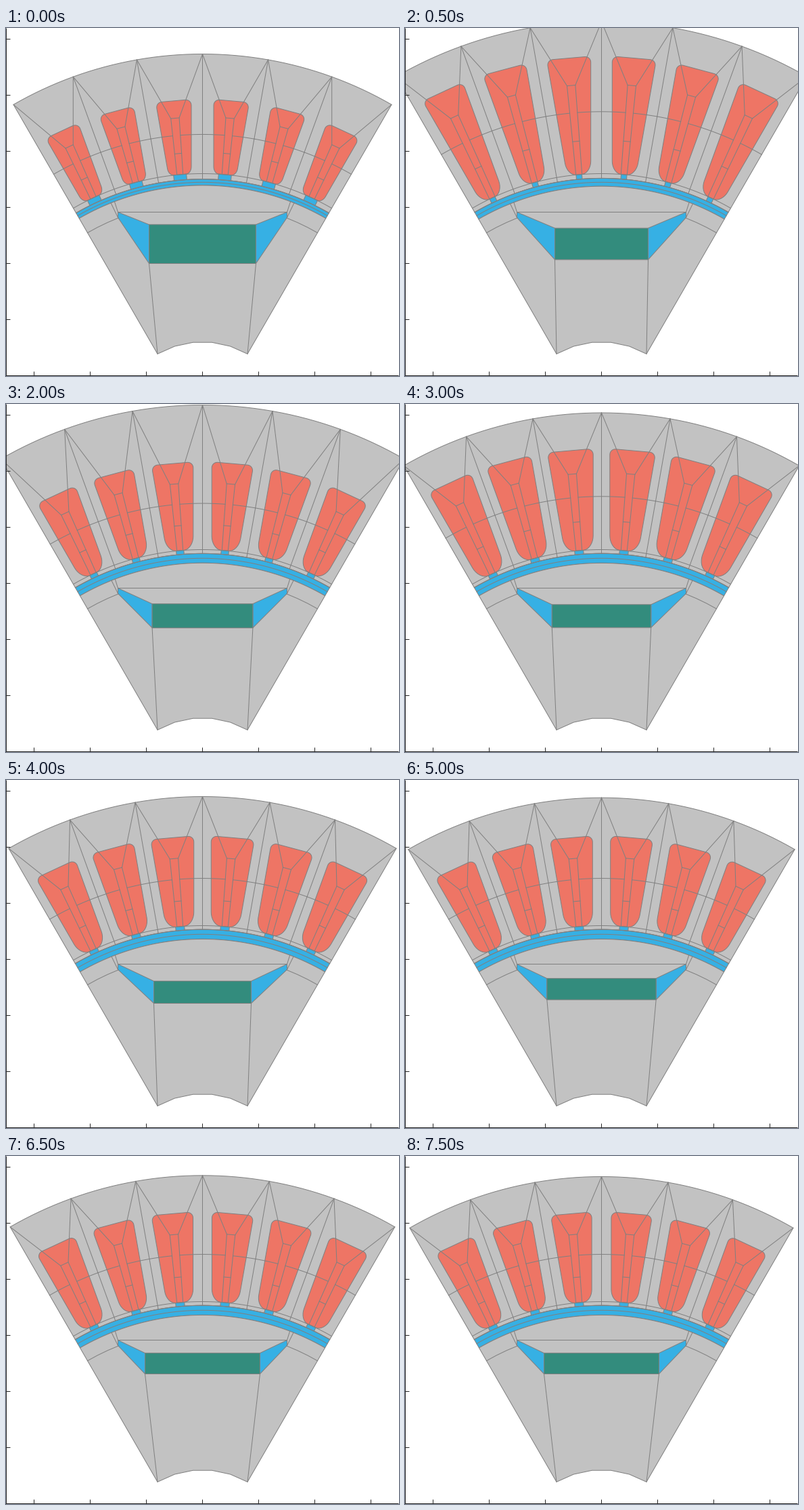
Recreate the animation shown at these times as a matplotlib script. Size 581x515 px, loop 8000 ms.

```python
import matplotlib.pyplot as plt
import numpy as np
from matplotlib.animation import FuncAnimation

W, H, DPI = 581, 515, 100
CX, CY = 290.5, 597.5
GREY, EDGE, AXIS = "#c2c2c2", "#808080", "#262626"
COIL, AIR, MAGNET = "#ee7565", "#36b0e4", "#338c7d"
SHAFT, GAP, TIP = 133, 369.2, 382
PITCH = np.radians(5)
STEPS = 16
PEN = dict(lw=0.72, snap=False)

fig = plt.figure(figsize=(W / DPI, H / DPI), dpi=DPI, facecolor="white")
ax = fig.add_axes([0, 0, 1, 1])


def keys(step, *pairs):
    return np.interp(step, *zip(*pairs))


class Design:
    """Motor dimensions at one step of the search."""

    def __init__(self, n):
        self.outer = keys(n, (0, 559), (1, 607), (2, 602), (3, 584),
                          (4, 596), (8, 573), (15, 567))
        self.slot = keys(n, (0, 491.5), (1, 555), (3, 501.5), (6, 530.5), (8, 514))
        self.tooth = keys(n, (0, 16.5), (6, 12.3), (15, 14.4))
        self.mouth = keys(n, (0, 9.5), (1, 4.3), (6, 6.5))
        self.half = keys(n, (0, 79), (1, 69), (3, 75), (8, 72), (11, 85))
        self.bottom = keys(n, (0, 348.5), (3, 331.5), (8, 330.5), (11, 322.5))
        slope = 0.48 - 0.08 * np.exp(-n / 3)
        self.top = 272.5 + slope * (125 - self.half)
        air = 7.1 - 2.5 * np.exp(-n / 1.4)
        self.bore, self.rotor = GAP + air, GAP - air

    def depth(self, part):
        return TIP + part * (self.slot - TIP)

    def side(self, r):
        return r * np.tan(PITCH) - self.tooth / np.cos(PITCH)


def polar(r, deg):
    a = np.radians(deg)
    return np.stack([CX + r * np.sin(a), CY - r * np.cos(a)], axis=-1)


def arc(r, a=-30, b=30, n=49):
    return polar(r, np.linspace(a, b, n))


def local(points, deg):
    """Map (across, radial) slot coordinates to the stage."""
    t, r = np.asarray(points, float).T
    c, s = np.cos(np.radians(deg)), np.sin(np.radians(deg))
    return np.column_stack([CX + t * c + r * s, CY + t * s - r * c])


def fill(points, color):
    ax.fill(*np.asarray(points).T, facecolor=color, edgecolor=EDGE,
            joinstyle="round", **PEN)


def line(points, color=EDGE):
    ax.plot(*np.asarray(points).T, color=color, **PEN)


def fillet(prev, corner, nxt, before, after):
    p, c, q = (np.asarray(v, float) for v in (prev, corner, nxt))
    a = c + (p - c) / np.linalg.norm(p - c) * before
    b = c + (q - c) / np.linalg.norm(q - c) * after
    u = np.linspace(0, 1, 9)[:, None]
    k = 1.414 * u * (1 - u)
    return ((1 - u) ** 2 * a + k * c + u ** 2 * b) / ((1 - u) ** 2 + k + u ** 2)


def draw_slot(deg, d):
    lo, hi, m = d.side(TIP), d.side(d.slot), d.mouth
    bl, tl, tr, br = (-lo, TIP), (-hi, d.slot), (hi, d.slot), (lo, TIP)
    flat, rise = lo - m, 1.4 * (lo - m)
    coil = np.vstack([fillet(br, bl, tl, flat, rise), fillet(bl, tl, tr, 9, 9),
                      fillet(tl, tr, br, 9, 9), fillet(tr, br, bl, rise, flat)])
    fill(local(coil, deg), COIL)
    fill(local([(-m, TIP), (m, TIP), (m, d.bore), (-m, d.bore)], deg), AIR)

    inner, cross, mid = d.depth(0.765), d.depth(0.285), d.depth(0.53)

    def width(r):
        return np.interp(r, [TIP, inner], [4.5, 6.2])

    for s in (-1, 1):
        core = local([(s * width(inner), inner), (s * width(TIP), TIP)], deg)
        line(np.vstack([polar(d.outer, deg + 5 * s), core]))
        edge = np.degrees(width(mid) / mid)
        line(arc(mid, deg + s * edge, deg + 5 * s, 7))
    for r in (inner, cross):
        line(local([(-width(r), r), (width(r), r)], deg))


def draw_rotor(d):
    fill(np.vstack([arc(d.rotor), arc(SHAFT, 30, -30, 6)]), GREY)
    line([(CX - 125, 272.5), (CX + 125, 272.5)])
    for s in (-1, 1):
        tip, heel, x = (CX + s * 125, 272.5), (CX + s * 125, 280.5), CX + s * d.half
        fill([tip, heel, (x, d.bottom), (x, d.top)], AIR)
        line([(x, d.bottom), polar(SHAFT, 30 * s)])
        line(arc(340, 21.5 * s, 30 * s, 4))
        line([tip, polar(d.rotor, 20.9 * s)])
        line([heel, polar(d.rotor, 21.8 * s)])
    l, r = CX - d.half, CX + d.half
    fill([(l, d.top), (r, d.top), (r, d.bottom), (l, d.bottom)], MAGNET)


def draw_axes():
    line([(0.5, 1), (0.5, 514.5), (580, 514.5)], AXIS)
    for k in range(7):
        x, y = 41.5 + 83 * k, 16.5 + 83 * k
        line([(x, 509), (x, 515)], AXIS)
        line([(0, y), (6, y)], AXIS)


def draw(step):
    d = Design(step)
    ax.clear()
    ax.set(xlim=(0, W), ylim=(H, 0))
    ax.axis("off")

    fill(np.vstack([arc(d.outer), arc(d.bore, 30, -30)]), GREY)
    fill(np.vstack([arc(d.bore), arc(d.rotor, 30, -30)]), AIR)
    draw_rotor(d)
    line(arc(TIP))
    for deg in range(-20, 21, 10):
        line([polar(d.outer, deg), polar(d.bore, deg)])
    for deg in range(-25, 26, 10):
        draw_slot(deg, d)
    line(arc(d.bore))
    line(arc(GAP))
    draw_axes()
    return []


anim = FuncAnimation(fig, draw, frames=STEPS, interval=500,
                     init_func=lambda: [], repeat=True, repeat_delay=0)
plt.show()
```
